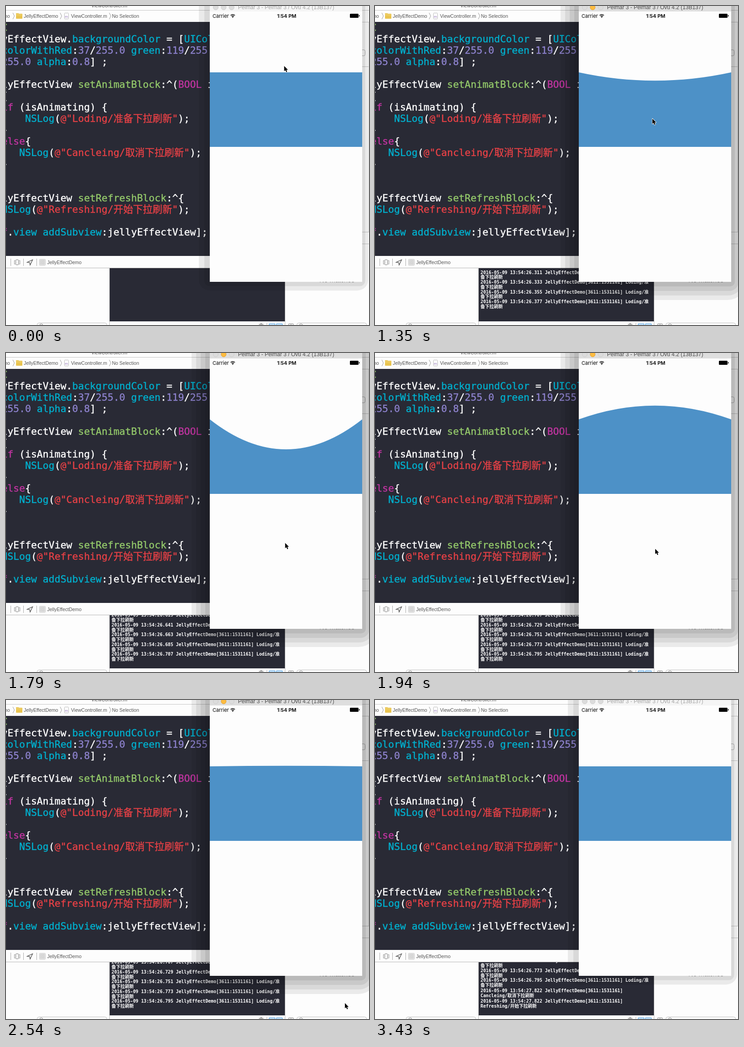
An HTML page with a canvas that plays this animation: 798 by 702 pixels, repeating every 3.53 s.

```html
<!DOCTYPE html>
<html lang="en">
<head>
<meta charset="utf-8">
<title>Jelly effect demo</title>
<style>
html, body { margin: 0; width: 100%; height: 100%; overflow: hidden; background: #fdfdfd; }
canvas { display: block; }
</style>
</head>
<body>
<canvas id="stage" width="798" height="702"></canvas>
<script>
const ctx = document.getElementById('stage').getContext('2d');
const LOOP = 3530, PRESS = 1200, BLUR = 3430, LAST_STEP = 12;
const DARK = '#292a35', PAPER = '#fdfdfd', BLUE = '#4d91c7', RULE = '#c4c4c4';
const UI = '10.5px "Liberation Sans", sans-serif';
const MONO = '"DejaVu Sans Mono", "Noto Sans CJK SC", "Noto Sans CJK", monospace';
const CODE = `21.5px ${MONO}`;
const LOG = `bold 9.8px ${MONO}`;

const SOURCE = `C
yEffectView.backgroundColor = [UIColor
colorWithRed:37/255.0 green:119/255.0
255.0 alpha:0.8] ;

lyEffectView setAnimatBlock:^(BOOL is
{
if (isAnimating) {
    NSLog(@"Loding/准备下拉刷新");
}
else{
   NSLog(@"Cancleing/取消下拉刷新");
}


lyEffectView setRefreshBlock:^{
NSLog(@"Refreshing/开始下拉刷新");

f.view addSubview:jellyEffectView];`.split('\n');

const TOKEN = new RegExp([
  '(?<string>@"[^"]*")',
  '(?<number>\\d+(?:\\.\\d+)?)',
  '(?<keyword>\\b(?:if|else|BOOL)\\b|^f(?=\\.))',
  '(?<method>\\bset\\w+Block\\b|^C$)',
  '(?<symbol>\\b(?:backgroundColor|UIColor|colorWithRed|green|alpha|NSLog|view|addSubview)\\b)',
  '(?<plain>\\s+|\\w+|.)'
].join('|'), 'g');
const INK = { string: '#e64146', number: '#8d82cd', keyword: '#c034a0',
  method: '#93c86a', symbol: '#00afcd', plain: '#ffffff' };

function fill(x, y, w, h, color) {
  ctx.fillStyle = color;
  ctx.fillRect(x, y, w, h);
}

function text(str, x, y, font, color, align = 'left') {
  ctx.font = font;
  ctx.fillStyle = color;
  ctx.textAlign = align;
  ctx.fillText(str, x, y);
}

function paint(fillColor, strokeColor, width = 1) {
  if (fillColor) { ctx.fillStyle = fillColor; ctx.fill(); }
  if (strokeColor) { ctx.strokeStyle = strokeColor; ctx.lineWidth = width; ctx.stroke(); }
}

function path(points, fillColor, strokeColor, width) {
  ctx.beginPath();
  points.forEach(([x, y]) => ctx.lineTo(x, y));
  if (fillColor) ctx.closePath();
  paint(fillColor, strokeColor, width);
}

function rounded(x, y, w, h, r, fillColor, strokeColor) {
  ctx.beginPath();
  ctx.roundRect(x, y, w, h, r);
  paint(fillColor, strokeColor);
}

function dot(x, y, r, fillColor, strokeColor) {
  ctx.beginPath();
  ctx.arc(x, y, r, 0, Math.PI * 2);
  paint(fillColor, strokeColor);
}

const stepTime = step => Math.round((1198 + step * 148.6) / 10) * 10;

function stepAt(time) {
  let step = -1;
  while (step < LAST_STEP && stepTime(step + 1) <= time) step++;
  return step;
}

function pointerAt(step) {
  if (step < 0) return { x: 611.5, y: 132 };
  const drag = Math.min(step / 5, 1);
  const exit = Math.max((step - 7) / 2, 0) ** 1.35;
  return {
    x: Math.min(609.5 + 6.5 * drag ** 2 + 129 * exit, 749),
    y: Math.min(166 + 265 * Math.sin(drag * Math.PI / 2) + 236 * exit, 690)
  };
}

// The edge follows the pointer while dragged, then springs back.
function sagAt(step) {
  if (step < 0 || step > 10) return 0;
  if (step < 4) return (pointerAt(step).y - 166) * .223;
  const beat = step - 4;
  return 66 * Math.cos(Math.PI * beat) * .46 ** beat;
}

function logCount(step) {
  if (step < 1) return 0;
  return Math.min(5 * step - 1, 23) + (step >= 10) + (step >= 12);
}

function logEntry(i) {
  const loading = i < 23;
  const stamp = loading ? `26.${795 - 22 * (22 - i)}` : '27.822';
  const head = `2016-05-09 13:54:${stamp} JellyEffectDemo[3611:1531161]`;
  if (loading) return { head: head + ' Loding/准', tail: '备下拉刷新', leading: 10.75 };
  return { head, tail: i === 23 ? 'Cancleing/取消下拉刷新' : 'Refreshing/开始下拉刷新', leading: 11.5 };
}

function drawJumpBar() {
  text('ViewController.m', 227, 3, UI, '#555', 'center');
  fill(0, 9, 798, 1, RULE);
  text('no', -3, 26, UI, '#555');
  for (const x of [15, 119, 227]) path([[x, 15], [x + 3.5, 22], [x, 29]], null, '#999');
  rounded(22, 17, 14, 11, 1, '#e9c451');
  fill(22, 16, 6, 2, '#e9c451');
  fill(22, 19, 13, 1, '#f5dd86');
  text('JellyEffectDemo', 39, 26, UI, '#555');
  rounded(128.5, 15.5, 9, 13, 1, '#fff', '#bbb');
  text('m', 129.5, 26, '8px "Liberation Sans", sans-serif', '#8b6bb5');
  text('ViewController.m', 143, 26, UI, '#555');
  text('No Selection', 233, 26, UI, '#555');
}

function drawEditor() {
  fill(0, 35, 449, 515, DARK);
  ctx.lineWidth = .4;
  SOURCE.forEach((line, row) => {
    let x = -9.8;
    for (const { 0: word, groups } of line.matchAll(TOKEN)) {
      const kind = Object.keys(INK).find(name => groups[name] !== undefined);
      const y = 55 + row * 25;
      text(word, x, y, CODE, INK[kind]);
      ctx.strokeStyle = INK[kind];
      ctx.strokeText(word, x, y);
      x += ctx.measureText(word).width;
    }
  });
}

function drawDebugBar() {
  for (const x of [10, 38, 67]) fill(x, 556, 1, 16, '#aaa');
  rounded(21.5, 558.5, 6, 11, 1, null, '#777');
  for (const side of [-1, 1]) {
    const x = 24.5 + side * 4.5;
    path([[x, 560], [x + side * 1.5, 560], [x + side * 1.5, 568], [x, 568]], null, '#888');
  }
  path([[46.5, 564], [58.5, 558.5], [53, 570], [52, 564.5]], PAPER, '#444', 1.2);
  rounded(73.5, 557.5, 13, 13, 1, null, '#bbb');
  for (let i = 0; i < 9; i++) {
    rounded(75.5 + i % 3 * 3.5, 559.5 + Math.floor(i / 3) * 3.5, 2, 2, 0, null, '#bbb');
  }
  text('JellyEffectDemo', 90.5, 567.5, UI, '#555');
  fill(0, 576, 614, 1, '#b5b5b5');
}

function drawConsole(count) {
  ctx.save();
  ctx.beginPath();
  ctx.rect(228, 577, 385, 117);
  ctx.clip();
  fill(228, 577, 385, 117, DARK);
  let y = Math.min(677, 589.5 + (count * 2 - 1) * 10.75);
  for (let i = count - 1; i >= 0 && y > 570; i--) {
    const { head, tail, leading } = logEntry(i);
    text(tail, 232, y, LOG, '#fff');
    text(head, 232, y - leading, LOG, '#fff');
    y -= leading * 2;
  }
  ctx.restore();
}

function drawPanels() {
  for (const x of [227, 613]) fill(x, 577, 1, 125, '#bbb');
  for (const x of [68.5, 639.5]) {
    rounded(x, 697.5, 153, 18, 4, '#fff', '#bbb');
    dot(x + 9, 703, 3.5, null, '#777');
  }
  fill(556, 700, 10, 1, '#666');
  fill(559, 698.5, 4, 1, '#666');
  fill(573, 697, 1, 5, '#bbb');
  for (const x of [578.5, 594.5]) rounded(x, 699.5, 13, 9, 0, '#d5eafa', '#3b99e6');
  rounded(621.5, 699.5, 10, 8, 0, null, '#888');
  fill(626, 700, 1, 2, '#888');
  text('No matches', 689, 608, '14.5px "Liberation Sans", sans-serif', '#888');
  for (const y of [35, 133, 497, 523]) fill(783, y, 15, 1, RULE);
  rounded(770.5, 96.5, 19, 13, 3, '#fff', '#aaa');
  fill(797, 36, 1, 461, '#d0d0d0');
}

function drawShadow(active) {
  const bands = active ? 4 : 2;
  const reach = active ? 40 : 24;
  for (let i = bands; i > 0; i--) {
    const spread = reach * i / bands;
    const right = spread * (active ? .8 : .55);
    const below = spread * (active ? 1 : .8);
    rounded(448 - spread, -60, 335 + spread + right, 667 + below, spread, 'rgba(0,0,0,.075)');
  }
}

function drawStatusBar() {
  text('Carrier', 454, 26, '11px Inter, sans-serif', '#000');
  for (const r of [3.5, 6.3]) {
    ctx.beginPath();
    ctx.arc(498.5, 25, r, -Math.PI * .77, -Math.PI * .23);
    paint(null, '#000', 1.5);
  }
  dot(498.5, 24.3, 1.3, '#000');
  text('1:54 PM', 617, 26, '600 11px Inter, sans-serif', '#000', 'center');
  rounded(756, 17, 19, 9, 1.5, '#000');
  fill(776, 20, 1.5, 3, '#000');
}

function drawSimulator(active, sag) {
  fill(448, 0, 335, 12, active ? '#dedede' : '#f5f5f5');
  for (let i = 0; i < 3; i++) {
    const lit = active && i === 1;
    dot(461 + i * 17.5, 3, 5.5, lit ? '#fdbc40' : '#dcdcdc', lit ? '#e0a136' : '#cdcdcd');
  }
  text('Pelmar 3 - Pelmar 3 / Ovu 4.2 (13B137)', 510, 7,
    '12px "Liberation Sans", sans-serif', active ? '#4c4c4c' : '#a6a6a6');
  fill(448, 12, 335, 595, PAPER);
  drawStatusBar();

  ctx.beginPath();
  ctx.moveTo(448, 146);
  ctx.quadraticCurveTo(615.5, 146 + sag * 2, 783, 146);
  ctx.lineTo(783, 310);
  ctx.lineTo(448, 310);
  paint(BLUE);
}

function drawPointer({ x, y }) {
  const arrow = [[0, 0], [0, 11.6], [2.7, 9.2], [4.6, 13.6], [6.6, 12.7], [4.8, 8.5], [8.3, 8.4]];
  ctx.save();
  ctx.translate(x, y);
  ctx.lineJoin = 'round';
  path(arrow, '#fff', '#fff', 1.6);
  path(arrow, '#000');
  ctx.restore();
}

function render(time) {
  const step = stepAt(time);
  const active = time >= PRESS && time < BLUR;
  fill(0, 0, 798, 702, PAPER);
  drawJumpBar();
  drawEditor();
  drawDebugBar();
  drawConsole(logCount(step));
  drawPanels();
  drawShadow(active);
  drawSimulator(active, sagAt(step));
  if (step < 11) drawPointer(pointerAt(step));
}

const start = performance.now();
function loop() {
  render((performance.now() - start) % LOOP);
  requestAnimationFrame(loop);
}
loop();
</script>
</body>
</html>
```
